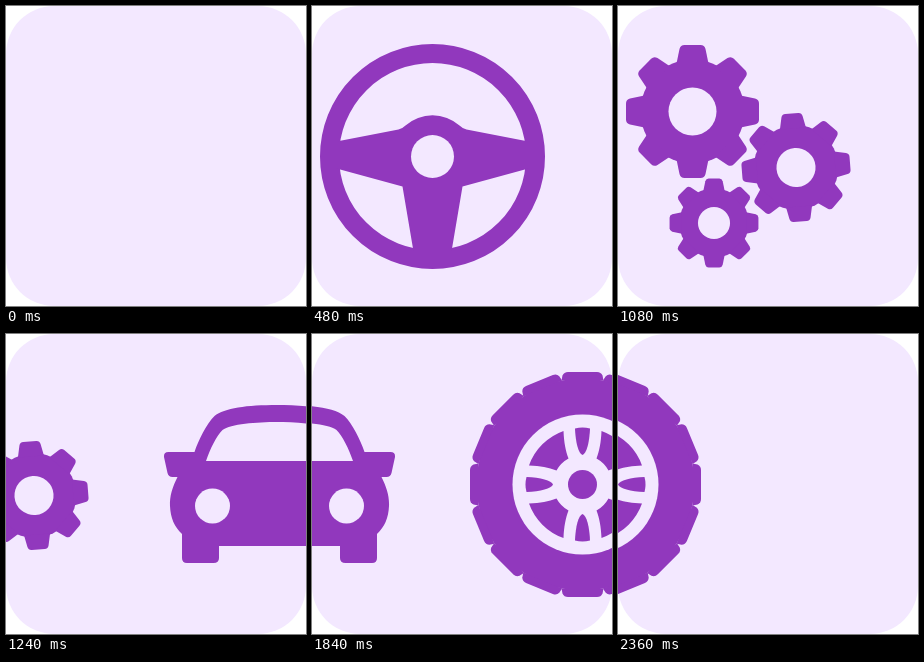
Write an HTML page that moves like this. It is 300 px wide and 300 px high and loops after 2.4 s.

```html
<!DOCTYPE html>
<html lang="en">
<head>
<meta charset="utf-8">
<title>Car icons</title>
<style>
  html, body { margin: 0; width: 100%; height: 100%; overflow: hidden; background: #fff; }
  svg { display: block; width: 100%; height: 100%; }
  .ink { fill: #9138bd; }
  .bg { fill: #f3e8ff; }
</style>
</head>
<body>
<svg viewBox="0 0 300 300">
  <defs>
    <path id="tooth" d="M-16 -48 L-13 -62.500 Q-12 -66.500 -8 -66.500 H8 Q12 -66.500 13 -62.500 L16 -48Z"/>
    <g id="gear">
      <circle r="52"/>
      <g class="teeth" data-use="tooth" data-n="8"></g>
      <circle class="bg" r="24"/>
    </g>
    <path id="tread" d="M-21 -104 L-20 -109 Q-18.500 -112.500 -14.500 -112.500 H14.500 Q18.500 -112.500 20 -109 L21 -104Z"/>
    <g id="spoke">
      <path d="M-7.500 -56 C-7 -42 -4 -31 0 -29.500 C4 -31 7 -42 7.500 -56 Q0 -58 -7.500 -56Z"/>
      <path d="M19 -53.500 A57 57 0 0 1 53.500 -19 C42 -18.500 34 -17 26 -14 A30 30 0 0 0 14 -26 C17 -34 18.500 -42 19 -53.500Z"/>
    </g>
    <g id="half">
      <path d="M1 71 C-30 71 -52 74 -62 82 C-70 90 -78 106 -82 118 H-108 Q-113 118 -112.500 123
        L-109 139 Q-108 143 -104 143 H-99 C-104 153 -107 162 -106.500 172 C-106 184 -102 193 -94.500 200
        V224 Q-94.500 229 -89.500 229 H-63 Q-57.500 229 -57.500 224 V212 H1 V127 H-70.500
        C-66 114 -60 102 -54 96 C-46 90 -20 88 1 88Z"/>
      <circle class="bg" cx="-64" cy="172" r="17.500"/>
    </g>
  </defs>

  <rect class="bg" width="300" height="300" rx="48"/>

  <g id="strip" class="ink">
    <!-- steering wheel -->
    <g transform="translate(150.500 150.500)">
      <circle r="103" fill="none" stroke="#9138bd" stroke-width="19"/>
      <path d="M-96 -15 L-34 -27 Q-30 -28 -27 -31 A41 41 0 0 1 27 -31 Q30 -28 34 -27 L96 -15 V12 L30 30 L19 95 H-19 L-30 30 L-96 12Z"/>
      <circle class="bg" r="21.500"/>
    </g>
    <!-- gears -->
    <g transform="translate(300 0)">
      <use href="#gear" transform="translate(104.500 105.500)"/>
      <use href="#gear" transform="translate(208 161.500) rotate(-4.500) scale(.815)"/>
      <use href="#gear" transform="translate(126 217) scale(.668)"/>
    </g>
    <!-- car -->
    <g transform="translate(750.500 0)">
      <use href="#half"/>
      <use href="#half" transform="scale(-1 1)"/>
    </g>
    <!-- tire -->
    <g transform="translate(1050.500 150.500)">
      <circle r="106"/>
      <g data-use="tread" data-n="16"></g>
      <circle class="bg" r="70"/>
      <g data-use="spoke" data-n="4"></g>
      <circle r="14.500"/>
    </g>
  </g>
</svg>
<script>
const LOOP = 2400, STEP = 40;
const strip = document.getElementById('strip');

// Repeat a shape around the centre of its group.
for (const g of document.querySelectorAll('[data-use]')) {
  const n = +g.dataset.n;
  for (let i = 0; i < n; i++) {
    const u = document.createElementNS('http://www.w3.org/2000/svg', 'use');
    u.setAttribute('href', '#' + g.dataset.use);
    u.setAttribute('transform', `rotate(${i * 360 / n})`);
    g.append(u);
  }
}

const slide = (tick, from, len) =>
  300 * Math.min(1, Math.max(0, (tick - from) / len));

// Slides advance at 30 ticks a second, shown every 40 ms.
function draw(ms) {
  const t = Math.floor(ms % LOOP / STEP) * STEP;
  const tick = Math.floor(t * 3 / 100);
  const x = 300 - slide(tick, 0, 5) - slide(tick, 13, 10)
    - slide(tick, 31, 10) - slide(tick, 49, 10) - slide(tick, 67, 5);
  strip.setAttribute('transform', `translate(${x} 0)`);
}

const start = performance.now();
function loop() {
  draw(performance.now() - start);
  requestAnimationFrame(loop);
}
loop();
</script>
</body>
</html>
```
